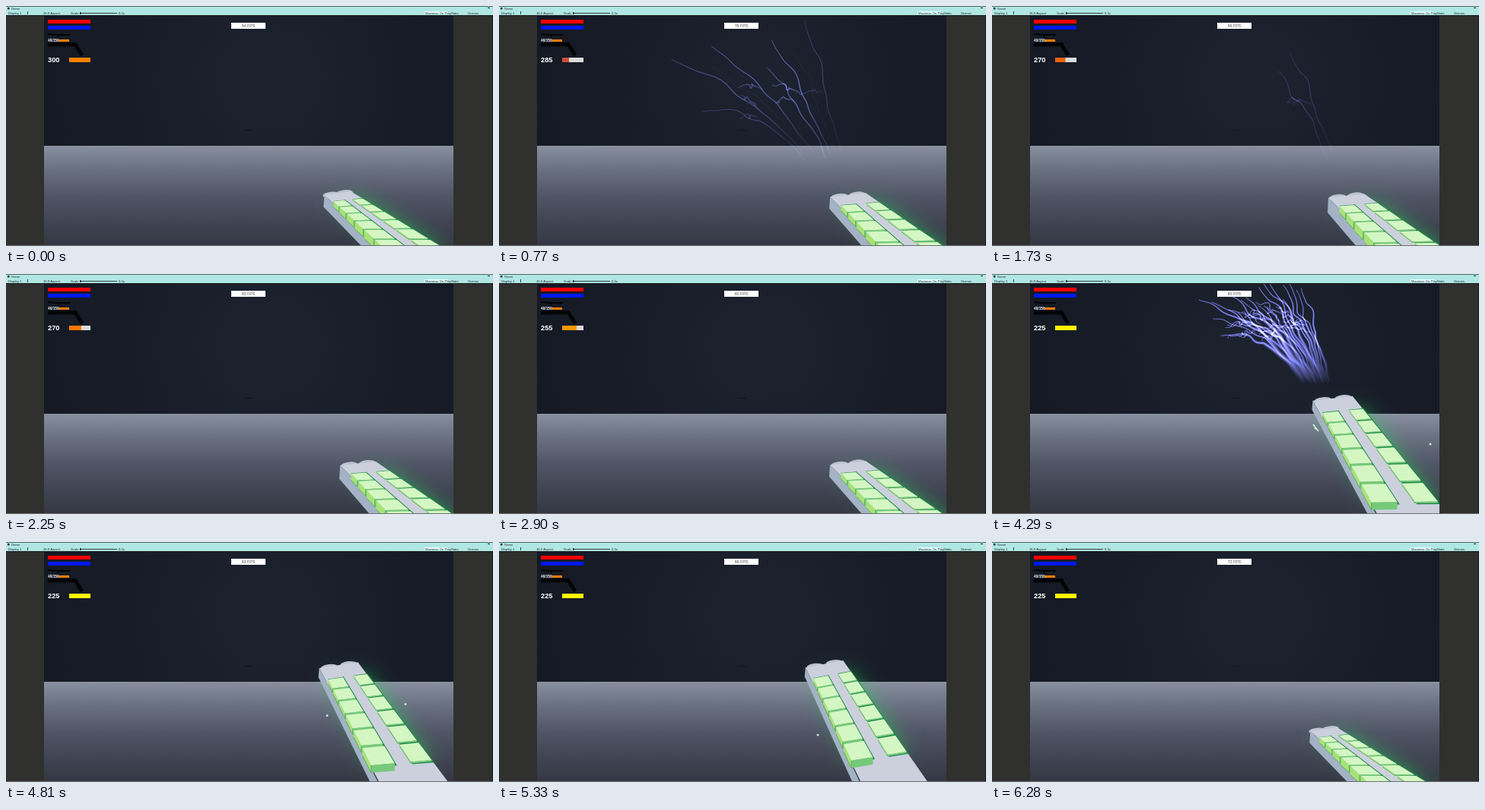
Write an HTML page with a canvas that moves like this. It is 640 by 316 pixels and loops after 6340 ms.

```html
<!DOCTYPE html>
<html lang="en">
<head>
<meta charset="utf-8">
<title>Game view</title>
<style>
html, body { margin: 0; width: 100%; height: 100%; overflow: hidden; background: #30302e; }
canvas { display: block; width: 640px; height: 316px; }
</style>
</head>
<body>
<canvas id="stage" width="640" height="316"></canvas>
<script>
const g = document.getElementById('stage').getContext('2d');
const LOOP = 6340;
const mix = (a, b, k) => a + (b - a) * k;
const mixAll = (a, b, k) => a.map((v, i) => mix(v, b[i], k));
const ease = k => k * k * (3 - 2 * k);
const clamp = k => Math.max(0, Math.min(1, k));
const move = (p, dx, dy) => [p[0] + dx, p[1] + dy];

function seeded(seed) {
  return () => (seed = (seed * 16807) % 2147483647) / 2147483647;
}
// Interpolates rows of [time, ...values]; holds the end values.
function track(keys, t, curve = k => k) {
  const next = keys.findIndex(key => key[0] > t);
  if (next < 0) return keys[keys.length - 1].slice(1);
  if (next === 0) return keys[0].slice(1);
  const a = keys[next - 1], b = keys[next];
  return mixAll(a, b, curve((t - a[0]) / (b[0] - a[0]))).slice(1);
}
function rect(color, x, y, w, h) {
  g.fillStyle = color;
  g.fillRect(x, y, w, h);
}
function label(text, x, y, font, color, align = 'left') {
  g.font = font + ' "Liberation Sans", Arial, sans-serif';
  g.fillStyle = color;
  g.textAlign = align;
  g.fillText(text, x, y);
}
function trace(points) {
  g.beginPath();
  points.forEach(p => g.lineTo(p[0], p[1]));
}
function poly(points, fill) {
  trace(points);
  g.closePath();
  g.fillStyle = fill;
  g.fill();
}
function line(points, color, width) {
  trace(points);
  g.strokeStyle = color;
  g.lineWidth = width;
  g.stroke();
}

// A pose is the cell area's front left, front right, back left and back right
// corner, followed by the thickness of the body.
const low = [430,257, 468,253, 500,322, 582,323, 26];
const aim = [449,262, 499,258, 530,348, 630,348, 26];
const recoil = [434,182, 487,177, 500,303, 588,302, 20];
const raised = [413,179, 462,170, 464,290, 537,278, 20];
const poseKeys = [
  [0, ...low], [450, ...low], [700, ...aim], [1730, ...aim.map((v, i) => v + (i % 2 ? 1 : 7))],
  [2900, ...aim], [4110, ...aim], [4250, ...recoil], [5330, ...raised], [5950, ...low]
];

// Maps u (across) and v (along) on the top face to the stage.
const surface = p => (u, v) => [0, 1].map(i =>
  mix(mix(p[i], p[2 + i], u), mix(p[4 + i], p[6 + i], u), v));

const CELLS = 6;
const depth = i => (1.14 ** i - 1) / (1.14 ** CELLS - 1);

function cells(at, u0, u1, height) {
  poly([at(u0, 0), at(u1, 0), at(u1, 1), at(u0, 1)], '#1f8a4c');
  line([at(u1, 0), at(u1, 1), at(u0, 1)], '#1f8a4c', 2);
  for (let i = 0; i < CELLS; i++) {
    const near = depth(i + 0.05), far = depth(i + 0.92);
    const a = at(u0, near), b = at(u1, near), c = at(u1, far), d = at(u0, far);
    const drop = p => move(p, 0, height * mix(0.5, 1, far));
    poly([a, d, drop(d), drop(a)], '#a8e277');
    poly([d, c, drop(c), drop(d)], '#77c97a');
    line([drop(a), drop(d), d], '#4fa956', 0.8);
    poly([a, b, c, d], '#d4f6c3');
  }
}

function weapon(pose) {
  const at = surface(pose), thick = pose[8];
  const front = -0.13, back = 1.35;
  const fl = at(-0.08, front), fr = at(1, front);
  const side = [fl, at(-0.02, back), move(at(-0.02, back), 0, thick * 1.1), move(fl, -1, thick * 0.6)];
  g.save();
  g.shadowColor = 'rgba(35,215,90,.6)';
  g.shadowBlur = 24;
  poly([at(0, 0), at(1, 0), at(1, 1), at(0, 1)], '#39a85c');
  g.restore();
  g.fillStyle = '#bcc2d0';
  for (const k of [0.2, 0.74]) {
    g.beginPath();
    g.ellipse(...move(at(k, front), 0, 1), 11, 4, -0.1, 0, 7);
    g.fill();
  }
  poly([fl, fr, at(1, back), at(0, back)], '#cbd0dc');
  poly(side, '#a3b2c4');
  cells(at, 0, 0.39, thick / 2);
  cells(at, 0.66, 1, 2);
}

// A tapered ribbon along a wavy arc; "worn" moves its root fade toward the tip.
function bolt(tip, bend, root, width, alpha, worn, rnd) {
  const phase = rnd() * 6, path = [];
  for (let j = 0; j <= 40; j++) {
    const s = j / 40, wave = (1 - s) * Math.min(1, s * 8);
    const p = mixAll(mixAll(tip, bend, s), mixAll(bend, root, s), s);
    path.push(move(p,
      wave * (4 * Math.sin(13 * s + phase) + 1.5 * Math.sin(41 * s + phase)),
      wave * (3 * Math.sin(17 * s - phase) + 2 * Math.sin(29 * s + phase))));
  }
  const fill = (rgb, strength) => {
    const fade = g.createLinearGradient(...tip, ...root);
    fade.addColorStop(0, `rgba(${rgb},${alpha * strength * 0.6})`);
    fade.addColorStop(mix(0.5, 0.3, worn), `rgba(${rgb},${alpha * strength})`);
    fade.addColorStop(mix(0.95, 0.75, worn), `rgba(${rgb},0)`);
    return fade;
  };
  const ribbon = (size, style) => {
    const edge = sign => path.map((p, j) => {
      const a = path[Math.max(0, j - 1)], b = path[Math.min(40, j + 1)];
      const dx = b[0] - a[0], dy = b[1] - a[1];
      const r = sign * mix(0.5, size / 2, j / 40) / Math.hypot(dx, dy);
      return move(p, -dy * r, dx * r);
    });
    poly([...edge(1), ...edge(-1).reverse()], style);
  };
  ribbon(width * 2.4, fill('70,68,165', 0.45));
  ribbon(width, fill('120,120,210', 0.75));
  return path;
}

const shots = [
  { start: 450, size: 1.35, count: 9 },
  { start: 1300, size: 1.3, count: 8 },
  { start: 2340, size: 1.5, count: 9 },
  { start: 4150, size: 1, count: 19 }
];

function burst({ start, size, count }, t, [rx, ry]) {
  const age = t - start, rnd = seeded(start + 77);
  if (age < 0 || age > 500) return;
  const worn = clamp(age / 400);
  for (let i = 0; i < count; i++) {
    const k = i / (count - 1), reach = size * mix(0.8, 1.1, rnd());
    const life = mix(320, 500, rnd());
    const alpha = clamp((1 - age / life) * 2);
    const width = Math.max(1.2, mix(2, 7, rnd()) * (1 - age / 330));
    const tip = [rx + reach * mix(-165, -30, k), ry - reach * mix(100, 155, Math.sqrt(k))];
    const bend = [rx + size * mix(-62, 0, k), ry - size * mix(90, 65, k)];
    const root = [rx + mix(-14, 12, k), ry];
    const path = bolt(tip, bend, root, width, alpha, worn, rnd);
    const from = path[12 + Math.floor(rnd() * 8)];
    const end = move(from, -20 - 25 * rnd(), -26 + 28 * rnd());
    bolt(end, move(from, -10, -14), from, 1.5, alpha * 0.8, 0, rnd);
  }
}

function lightning(t, pose) {
  const root = move(surface(pose)(0.35, -0.13), -8, -2);
  g.save();
  g.globalCompositeOperation = 'lighter';
  shots.forEach(shot => burst(shot, t, root));
  g.restore();
}

function scene() {
  const sky = g.createRadialGradient(350, 95, 20, 330, 100, 300);
  sky.addColorStop(0, '#1c222e');
  sky.addColorStop(1, '#141924');
  rect(sky, 50, 12, 538, 172);
  const floor = g.createLinearGradient(0, 184, 0, 316);
  ['#888f9f', '#686f7f', '#505565', '#414553', '#343743']
    .forEach((c, i) => floor.addColorStop(i / 4, c));
  rect(floor, 50, 184, 538, 132);
  rect('#0e121a', 314, 163, 11, 0.7);
}

function sparks(t) {
  if (t < 4220 || t > 5500) return;
  const k = (t - 4290) / 1040;
  const spot = (a, b) => rect('#c9f8cf', ...move(mixAll(a, b, k), -1.2, -1.2), 2.5, 2.5);
  spot([576, 224], [474, 203]);
  spot([425, 203], [419, 254]);
  if (t < 4400) line([[422, 198], [429, 207]], '#d7f6dc', 1.6);
}

const fpsKeys = [[0, 94], [770, 76], [1730, 66], [2900, 60], [4290, 60], [5330, 66], [6280, 72]];
const chargeKeys = [[450, 0.27], [2900, 0.68], [4150, 1]];

function hud(t) {
  rect('#f00', 55, 18, 56, 5);
  rect('#0018f5', 55, 26, 56, 5);
  line([[55, 37], [68, 38], [84, 38]], '#030405', 2);
  line([[68, 38], [69, 43]], '#030405', 1.5);
  line([[55, 51], [91, 50.5], [100, 65]], '#030405', 5);
  rect('#ff7c00', 69, 44, 14, 3);
  label('40/150', 55, 47.3, 'bold 4.8px', '#fff');
  const fired = shots.filter(s => s.start <= t).length;
  label(300 - 15 * (fired + (fired === shots.length)), 55, 74.3, 'bold 9.3px', '#fff');
  const fill = fired ? track(chargeKeys, t)[0] : 1;
  const hue = fired ? mix(-12, 58, fill) : 30;
  rect('#dcdcdc', 83, 68, 28, 6);
  rect(`hsl(${hue}, ${clamp(fill * 1.8) * 100}%, 50%)`, 83, 68, 28 * fill, 6);
  rect('#fff', 296, 22, 45, 8);
  label(Math.round(track(fpsKeys, t)) + ' FPS', 318.5, 28, '5.3px', '#555', 'center');
}

function toolbar() {
  rect('#b0e7e3', 0, 0, 640, 12);
  rect('#4d6665', 0, 0, 640, 1);
  rect('#1b1e20', 0, 12, 640, 1);
  const tiny = (s, x, y = 10.7) => label(s, x, y, '4.2px', '#223');
  rect('#223', 2, 2, 2.5, 2.5);
  tiny('Game', 7, 4.9);
  tiny('Display 1', 3);
  tiny('16:9 Aspect', 49);
  tiny('Scale', 85);
  rect('#2c4545', 97, 9, 49, 1);
  rect('#223', 97, 8, 1.5, 3);
  tiny('0.3x', 148);
  rect('#2c4545', 28, 7, 1, 4);
  rect('#e1fffb', 550, 7, 31, 4);
  tiny('Maximize On Play', 551);
  tiny('Stats', 585);
  tiny('Gizmos', 607);
  rect('#223', 633, 2, 3, 1);
}

function draw(now) {
  const t = now % LOOP, pose = track(poseKeys, t, ease);
  rect('#30302e', 0, 0, 640, 316);
  g.save();
  g.beginPath();
  g.rect(50, 12, 538, 304);
  g.clip();
  scene();
  lightning(t, pose);
  weapon(pose);
  sparks(t);
  hud(t);
  g.restore();
  toolbar();
  rect('#6c6e6e', 0, 315, 640, 1);
  rect('#1b1c1c', 639, 12, 1, 303);
}

const begin = performance.now();
function tick() {
  draw(performance.now() - begin);
  requestAnimationFrame(tick);
}
tick();
</script>
</body>
</html>
```
